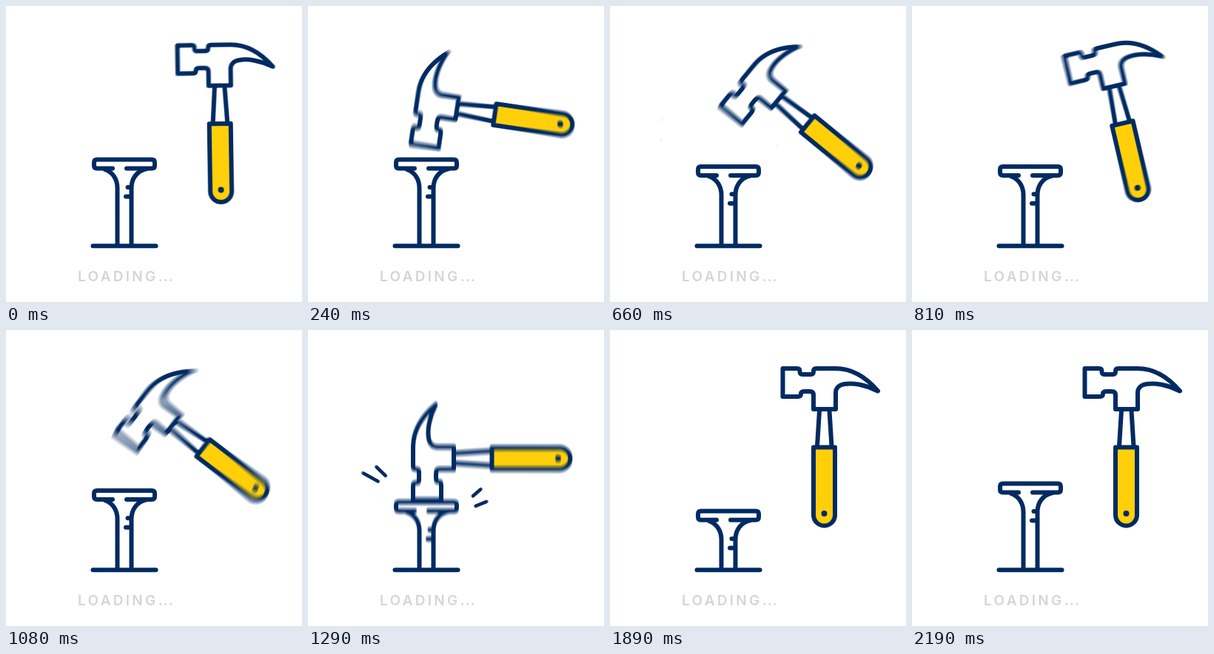
Recreate the animation shown at these times as an HTML page. Size 400 by 400 pixels, loop 2580 ms.

```html
<!DOCTYPE html>
<html lang="en">
<head>
<meta charset="utf-8">
<title>Loading</title>
<style>
  html, body { margin: 0; width: 100%; height: 100%; overflow: hidden; background: #fff; }
  svg { display: block; width: 100vw; height: 100vh; }
  .ink { fill: none; stroke: #002b62; stroke-width: 6; stroke-linecap: round; stroke-linejoin: round; }
  .spark { stroke-width: 4.6; }
  text { font: 600 19px Inter, Lato, sans-serif; letter-spacing: 3.3px; fill: #d5d5d5; }
  .dots { letter-spacing: 1px; }
</style>
</head>
<body>
<svg viewBox="0 0 400 400">
  <defs>
    <g id="hammer" class="ink">
      <path d="M233.5 52H253q3.5 0 3.5 4t3.5 4h11.5q3.5 0 3.5-4t3.5-4H305
               C330 52 348 66 362 82.5C345 74 328 71 317 73C309 74 305 79 305 85V107H275V88
               q0-5-5-5h-8q-4 0-4 3.5t-4 3.5H233.5Z"/>
      <path d="M283 109L280 157M296.5 109L299.5 157"/>
      <path d="M275 158.5h29V250a14.5 14.5 0 0 1-29 0Z" fill="#ffcf0a"/>
      <circle cx="289.5" cy="248" r="4" fill="#002b62" stroke="none"/>
    </g>
    <g id="nail" class="ink">
      <path d="M144 219.6H123q-4 0-4-4v-4q0-4 4-4h74q4 0 4 4v4q0 4-4 4H163"/>
      <path d="M134 221C145 225 150.5 235 150.5 246V324M190 220C176 223 169.5 234 169.5 246V324"/>
      <path d="M164.5 245h4.5M162 257.5h7"/>
    </g>
  </defs>
  <g id="scene"></g>
  <text x="97" y="372">LOADING<tspan class="dots">...</tspan></text>
</svg>
<script>
const LOOP = 2580, STEP = 30, SAMPLES = 8, SHUTTER = 0.5;
const scene = document.getElementById('scene');

const clamp = v => Math.max(0, Math.min(1, v));
const progress = (s, a, b) => clamp((s - a) / (b - a));
const wave = turns => Math.sin(2 * Math.PI * turns);

function ease(s, a, b) {
  const u = progress(s, a, b);
  return u * u * (3 - 2 * u);
}

// Two blows drive the nail down, then it rises again
const nailDepth = s =>
  9.3 * ease(s, 9.5, 14.5) + 28.7 * ease(s, 41.2, 44.6) - 38 * ease(s, 62, 73);

function hammer(s, depth) {
  const first = ease(s, -0.6, 10), lift = ease(s, 14.4, 31);
  const second = ease(s, 31, 40), rest = ease(s, 43, 54.7);
  const swing = first - lift + second - rest;
  const pull = swing * swing;
  const dip = 8 * wave(first) + 10.7 * wave(progress(s, 43, 54.7) / 2);
  const x = -20.5 * pull, y = (depth - 30.5) * pull + dip;
  return `<use href="#hammer" transform="translate(${x} ${y}) rotate(${-90 * swing} 289.5 179)"/>`;
}

// Draws one burst; ray() takes the end point, direction and length
function burst(age, rays) {
  if (age < 0 || age > 12) return '';
  const u = clamp(age / 10);
  const tail = 1 - u ** 2.2, head = (1 - u) ** 2.1;
  const ray = (x, y, degrees, length) => {
    const angle = degrees * Math.PI / 180;
    const back = k => `${x - k * length * Math.cos(angle)} ${y - k * length * Math.sin(angle)}`;
    return `M${back(tail)}L${back(head)}`;
  };
  return `<path class="ink spark" d="${rays(ray)}" opacity="${clamp((12 - age) / 2)}"/>`;
}

const sparks = s =>
  burst(s - 10, ray => ray(70, 154, 224, 51) + ray(69, 181, 214, 29) + ray(226, 189, -33, 33)) +
  burst(s - 40, ray => ray(80, 173, 224, 37) + ray(54, 182, 209, 50) +
                       ray(244, 206, -41, 30) + ray(256, 226, -22, 34));

function layer(s, opacity) {
  const depth = nailDepth(s);
  return `<g opacity="${opacity}">
    <rect width="400" height="400" fill="#fff"/>
    <use href="#nail" y="${depth}"/>
    <rect y="324" width="400" height="76" fill="#fff"/>
    <path class="ink" d="M117.5 324.3h85"/>
    ${sparks(s)}${hammer(s, depth)}
  </g>`;
}

// Averages several moments within the shutter for motion blur
function draw(step) {
  let out = '';
  for (let i = 0; i < SAMPLES; i++) {
    const offset = ((i + 0.5) / SAMPLES - 0.5) * SHUTTER;
    out += layer(step + offset, 1 / (i + 1));
  }
  scene.innerHTML = out;
}

let origin = null, shown = 0;
function tick(now) {
  if (origin === null) origin = now;
  const step = Math.floor(((now - origin) % LOOP) / STEP);
  if (step !== shown) draw(shown = step);
  requestAnimationFrame(tick);
}
draw(0);
requestAnimationFrame(tick);
</script>
</body>
</html>
```
